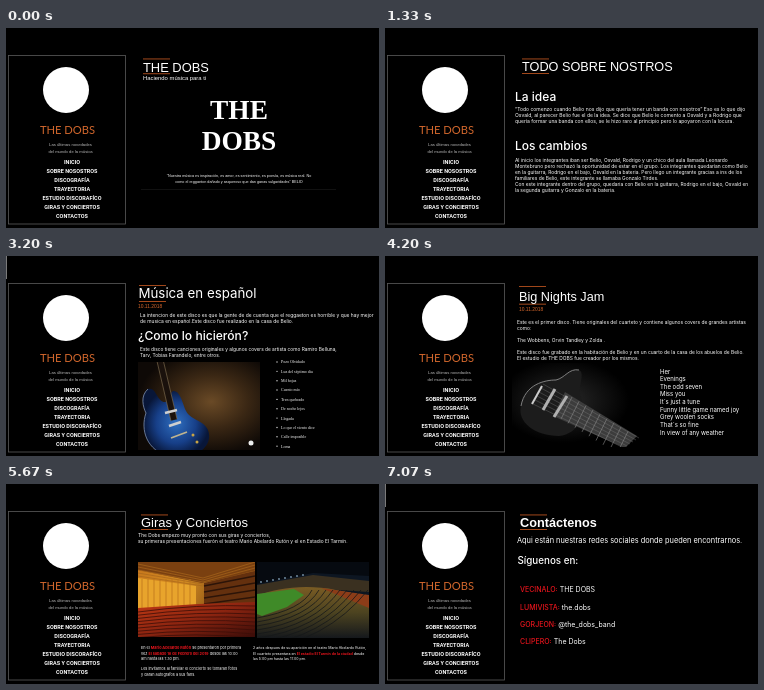
Recreate the animation shown at these times as an HTML page. Size 373x200 px, loop 7940 ms.

```html
<!DOCTYPE html>
<html lang="es">
<head>
<meta charset="utf-8">
<title>Sitio de la banda</title>
<style>
html, body { margin: 0; width: 100%; height: 100%; overflow: hidden; background: #000; }
svg { display: block; width: 100%; height: 100%; }
text { fill: #fff; font-family: Inter, "Open Sans", sans-serif; }
.arial { font-family: "Liberation Sans", Arial, sans-serif; }
.serif { font-family: "Liberation Serif", "Times New Roman", serif; }
.menu { font-family: Roboto, sans-serif; font-weight: 700; }
.brand { font-family: Lato, sans-serif; fill: #d0662c; }
.mid { text-anchor: middle; }
.bold { font-weight: 700; }
.half { font-weight: 500; }
.dim { fill: #bbb; }
.date { fill: #d9682c; }
.red { fill: #e8141c; }
.blue { fill: #35a8e0; }
</style>
</head>
<body>
<svg id="stage" viewBox="0 0 373 200" preserveAspectRatio="none">
  <defs>
    <radialGradient id="brown" cx=".6" cy=".45" r=".6">
      <stop offset="0" stop-color="#6a4a26"/><stop offset=".5" stop-color="#3a2714"/><stop offset="1" stop-color="#0e0906"/>
    </radialGradient>
    <radialGradient id="bluewood">
      <stop offset="0" stop-color="#2f6fc0"/><stop offset=".6" stop-color="#173f88"/><stop offset="1" stop-color="#081638"/>
    </radialGradient>
    <radialGradient id="grey" cx=".4" cy=".45" r=".5">
      <stop offset="0" stop-color="#2a2a2a"/><stop offset="1" stop-color="#000"/>
    </radialGradient>
    <radialGradient id="glow" cx=".52" cy=".5" r=".66">
      <stop offset=".28" stop-color="#e88a26"/><stop offset=".5" stop-color="#a04c0e"/>
      <stop offset=".78" stop-color="#522004"/><stop offset="1" stop-color="#210b02"/>
    </radialGradient>
    <linearGradient id="ring" x1="0" y1="0" x2="1" y2="1">
      <stop offset="0" stop-color="#d9761a"/><stop offset="1" stop-color="#ffe08a"/>
    </linearGradient>
    <linearGradient id="hall" x1="0" y1="0" x2="1" y2=".3">
      <stop offset="0" stop-color="#c8781c"/><stop offset=".45" stop-color="#d08a22"/><stop offset="1" stop-color="#5c2c0c"/>
    </linearGradient>
    <linearGradient id="seats" x1="0" y1="0" x2="1" y2="1">
      <stop offset="0" stop-color="#c23a14"/><stop offset=".5" stop-color="#8a2410"/><stop offset="1" stop-color="#3a0c08"/>
    </linearGradient>
    <linearGradient id="stand" x1="0" y1="0" x2="0" y2="1">
      <stop offset="0" stop-color="#7a5c24"/><stop offset=".5" stop-color="#4c4320"/><stop offset="1" stop-color="#15181c"/>
    </linearGradient>
  </defs>
</svg>
<script>
const LOOP = 7940;
const CUTS = [0, 1130, 2270, 3400, 4530, 5670, 6800];
const stage = document.getElementById('stage');

const text = (x, y, size, str, cls = '') =>
  `<text x="${x}" y="${y}" font-size="${size}" class="${cls}">${str}</text>`;
const lines = (x, y, step, size, list, cls) =>
  list.map((s, i) => text(x, y + i * step, size, s, cls)).join('');
const rect = (x, y, w, h, fill) =>
  `<rect x="${x}" y="${y}" width="${w}" height="${h}" fill="${fill}"/>`;
const path = (d, fill) => `<path d="${d}" fill="${fill}"/>`;
const stroke = (d, color, width) =>
  `<path d="${d}" fill="none" stroke="${color}" stroke-width="${width}"/>`;
const oval = (x, y, rx, ry, fill, more = '') =>
  `<ellipse cx="${x}" cy="${y}" rx="${rx}" ry="${ry}" fill="${fill}" ${more}/>`;
const bars = (x, top, bottom) =>
  rect(x, top, 27, .9, '#b4501e') + rect(x, bottom, 27, .9, '#b4501e');
const span = (cls, s) => `<tspan class="${cls}">${s}</tspan>`;
const repeat = (n, fn) => Array.from({ length: n }, (_, i) => fn(i)).join('');
const photo = (id, x, y, w, h, fill, art) =>
  `<clipPath id="${id}"><rect x="${x}" y="${y}" width="${w}" height="${h}"/></clipPath>
   <g clip-path="url(#${id})">${rect(x, y, w, h, fill)}${art}</g>`;

const edge = rect(0, 0, .8, 23, '#999');

const sidebar =
  '<rect x="2.5" y="27.5" width="117" height="168.5" fill="#000" stroke="#5a5a5a" stroke-width=".8"/>' +
  oval(60, 62, 23, 23, '#fff') +
  text(61.5, 106, 11.2, 'THE DOBS', 'brand mid') +
  lines(64.5, 117.5, 7, 4.2, ['Las últimas novedades', 'del mundo de la música'], 'arial dim mid') +
  lines(66, 136.4, 9, 5.5, ['INICIO', 'SOBRE NOSOSTROS', 'DISCOGRAFÍA', 'TRAYECTORIA',
    'ESTUDIO DISCORAFÍCO', 'GIRAS Y CONCIERTOS', 'CONTACTOS'], 'menu mid');

const blueGuitar = photo('p1', 132, 106, 122, 88, 'url(#brown)',
  path('M142 133C134 140 137 151 140 157C134 174 141 195 163 200C190 205 208 190 202 174C197 163 184 165 179 153C176 144 173 134 167 135C163 137 165 146 159 146C151 146 150 130 142 133Z', 'url(#bluewood)') +
  stroke('M142 133C134 140 137 151 140 157C134 174 141 195 163 200', '#8fa3c4', .7) +
  stroke('M153 100L168 164', '#1a110c', 6.5) +
  stroke('M150 101L165 165M156 99L171 163', '#8a7858', .6) +
  stroke('M159 157L171 154M163 170L175 166', '#cfcfcf', 2.6) +
  stroke('M165 182L181 176', '#c0b48f', 1.8) +
  oval(187, 179, 1.5, 1.5, '#c8a444') + oval(191, 186, 1.5, 1.5, '#c8a444')) +
  oval(245, 187, 2.5, 2.5, '#eee');

const greyGuitar = photo('p2', 127, 107, 130, 84, 'url(#grey)',
  path('M136 150C140 128 160 124 171 124C180 122 184 112 194 114C201 118 192 130 196 141C202 158 194 178 174 180C150 180 132 166 136 150Z', '#1c1c1c') +
  stroke('M136 150C140 128 160 124 171 124C180 122 184 112 194 114', '#8c8c8c', .9) +
  path('M180 136L252 180L240 192L168 160Z', '#3c3c3c') +
  repeat(6, i => stroke(`M${158 - i * 2} ${128 + i * 4}L${254 - i * 3} ${182 + i * 2}`, '#777', .4)) +
  repeat(9, i => stroke(`M${187 + i * 7} ${141 + i * 4.3}l-11 22`, '#8c8c8c', .6)) +
  stroke('M170 133L158 154M182 140L169 161', '#b0b0b0', 3) +
  stroke('M157 130L147 148', '#ccc', 2));

const eclipse = photo('p3', 128, 83, 96, 105, 'url(#glow)',
  oval(178, 135, 16.5, 27, '#050200', 'stroke="url(#ring)" stroke-width="1.5"'));

const theatre = photo('p4', 132, 78, 117, 75, 'url(#hall)',
  path('M132 78H249V88L196 99L132 86Z', '#7a4010') +
  repeat(5, i => stroke(`M132 ${80 + i * 3}L197 ${94 + i * 2}L249 ${78 + i * 3}`, '#a8661c', .7)) +
  path('M132 94L190 102V122L132 125Z', '#e8a42c') +
  repeat(9, i => stroke(`M${136 + i * 6} 95V124`, '#b8701c', .7)) +
  path('M198 99L249 87V120L198 122Z', '#64300e') +
  repeat(4, i => stroke(`M198 ${102 + i * 6}L249 ${92 + i * 7}`, '#2c1408', 1.5)) +
  path('M132 124L192 120L249 118V153H132Z', 'url(#seats)') +
  repeat(9, i => stroke(`M132 ${128 + i * 3.2}Q190 ${120 + i * 3.5} 249 ${122 + i * 4}`, '#3c0e08', .8)));

const stadium = photo('p5', 251, 78, 112, 76, '#0d1622',
  path('M251 78H363V92L307 89L251 100Z', '#060a10') +
  path('M251 101L307 91L363 97V108L300 104L251 111Z', '#3a3020') +
  repeat(8, i => oval(255 + i * 6, 98 - i, .9, .7, '#a8cce8')) +
  path('M251 112C270 104 300 100 330 106L363 112V154H251Z', 'url(#stand)') +
  path('M315 104L363 111V124Z', '#8c3c18') +
  path('M251 110L288 105L298 111L281 123L256 132L251 130Z', '#3f8a28') +
  repeat(9, i => stroke(`M251 ${134 + i * 4}Q${296 + i * 3} ${126 + i * 4} ${306 + i * 7} 106`, '#16181a', .8)));

const slides = [
  bars(137, 30.5, 45.3) +
  text(137, 43.6, 12.9, 'THE DOBS', 'arial') +
  text(137, 52, 5.9, 'Haciendo música para ti', 'arial') +
  lines(233, 91, 30.5, 27.4, ['THE', 'DOBS'], 'serif bold mid') +
  lines(233, 148.7, 6.4, 3.75, [
    '“Nuestra música es inspiración, es amor, es sentimiento, es poesía, es música real. No',
    'como el reggaeton dañado y asqueroso que dan ganas vulgaridades” BELIO'], 'arial mid') +
  rect(135, 161, 195, .5, '#222'),

  bars(137, 30.5, 45) +
  text(137, 43, 12.7, 'TODO SOBRE NOSTROS', 'arial') +
  text(130, 73, 12, 'La idea', 'half') +
  lines(130, 83, 6.2, 5, [
    '“Todo comenzo cuando Belio nos dijo que quería tener un banda con nosotros” Eso es lo que dijo',
    'Osvald, al parecer Belio fue el de la idea. Se dice que Belio le comento a Osvald y a Rodrigo que',
    'quería formar una banda con ellos, se le hizo raro al principio pero lo apoyaron con la locura.']) +
  text(130, 122, 12, 'Los cambios', 'half') +
  lines(130, 134.3, 5.9, 4.9, [
    'Al inicio los integrantes iban ser Belio, Osvald, Rodrigo y un chico del aula llamada Leonardo',
    'Montebruno pero rechazó la oportunidad de estar en el grupo. Los integrantes quedarían como Belio',
    'en la guitarra, Rodrigo en el bajo, Osvald en la bateria. Pero llego un integrante gracias a ins de los',
    'familiares de Belio, este integrante se llamaba Gonzalo Tirdes.',
    'Con este integrante dentro del grupo, quedaria con Belio en la guitarra, Rodrigo en el bajo, Osvald en',
    'la segunda guitarra y Gonzalo en la bateria.']),

  edge + bars(133, 29, 45) +
  text(132.5, 42, 13.3, 'Música en español') +
  text(132, 51.8, 4.9, '10.11.2018', 'arial date') +
  lines(134, 61, 6.2, 4.9, [
    'La intencion de este disco es que la gente de de cuenta que el reggaeton es horrible y que hay mejor',
    'de musica en español.Este disco fue realizado en la casa de Belio.']) +
  text(132, 83.5, 12.1, '¿Como lo hicierón?', 'half') +
  lines(134, 95, 6.2, 4.8, [
    'Este disco tiene canciones originales y algunos covers de artista como Ramiro Belluna,',
    'Tarv, Tobias Farandelo, entre otros.']) +
  blueGuitar +
  repeat(10, i => oval(271, 106 + i * 9.35, .7, .7, '#ddd')) +
  lines(275, 107.4, 9.35, 4, ['Pozo Olvidado', 'Luz del séptimo dia', 'Mil hojas', 'Cuento mío',
    'Tren quebrado', 'De noche lejos', 'Llegada', 'Lo que el viento dice', 'Calle imposible', 'Loma'], 'serif'),

  bars(134, 30, 47.7) +
  text(134, 44.5, 12.7, 'Big Nights Jam', 'arial') +
  text(134, 55.2, 4.9, '10.11.2018', 'arial date') +
  lines(132, 67.5, 6, 4.9, [
    'Este es el primer disco. Tiene originales del cuarteto y contiene algunos covers de grandes artistas',
    'como:', '', 'The Wobbens, Orvin Tandley y Zolda .', '',
    'Este disco fue grabado en la habitación de Belio y en un cuarto de la casa de los abuelos de Belio.',
    'El estudio de THE DOBS fue creador por los mismos.']) +
  greyGuitar +
  lines(275, 117.5, 7.65, 6, ['Her', 'Evenings', 'The odd seven', 'Miss you', 'It´s just a tune',
    'Funny little game named joy', 'Grey woolen socks', 'That´s so fine', 'In view of any weather']),

  bars(134, 30, 48) +
  text(134, 45, 12.7, 'Estudio Discografico', 'arial') +
  lines(132, 58.3, 6, 4.9, [
    '“Aqui se realiza toda la magia”, esto es lo que dice Belio al respecto del tema de su estudio',
    'discografico.']) +
  eclipse +
  lines(225, 87, 5.6, 4.9, [
    'Belio dialogo con los demas itengrantes y les dijo que ellos',
    'necesitaban un contrato conn alguna compañia',
    'discografica',
    'porque ellos podian crear la suya.', '',
    'Entonces le dijeron a Belio que mirara un nombre y que',
    'creara la imagen o que la buscara.',
    'Asi que se puso a buscar y encontro 2 opciones,',
    'eran ' + span('blue', 'BrassHarbour o Fernglade'), '',
    'Belio le pregunto a cual era mejor logo, a los',
    'muchachos les optarón por BrassHarbour,',
    'Belio se puso a buscar imagenes del sol y sus rayos pero',
    'nada le llamaba la atencion;',
    'hasta que decidio buscar al Eclipse solar para ver si',
    'encontraba algo que le pudiese interesar,',
    'y efectivamente le llamo la atención la imagen de un',
    'Eclipse hermoso.',
    'La comunico a los demás y les gusto la idea.']),

  bars(135, 30.5, 45) +
  text(135, 42.6, 13, 'Giras y Conciertos', 'arial') +
  lines(132, 53, 6.4, 4.85, [
    'The Dobs empezo muy pronto con sus giras y conciertos,',
    'su primeras presentaciones fuerón el teatro Mario Abelardo Rutón y el en Estadio El Tarmín.']) +
  theatre + stadium +
  lines(135, 165, 5.5, 3.8, [
    'En el ' + span('red bold', 'Mario Abelardo Rutón') + ' se presentaron por primera',
    'vez ' + span('red bold', 'El sabado 16 de Febrero del 2019') + ' desde las 10:00',
    'am hasta las 1:30 pm.']) +
  lines(135, 186, 5.5, 3.8, [
    'Les invitamos al familiar el concierto se tomaran fotos',
    'y daran autografos a sus fans.']) +
  lines(247, 165, 5.5, 3.6, [
    '2 años despues de su aparición en el teatro Mario Abelardo Rutón,',
    'El cuarteto presentara en ' + span('red bold', 'El estadio El Tarmín de la ciudad') + ' desde',
    'las 5:00 pm hasta las 11:00 pm.']),

  edge + bars(135, 30.5, 45) +
  text(135, 42.5, 12.7, 'Contáctenos', 'arial bold') +
  text(132, 58.5, 7.4, 'Aqui están nuestras redes sociales donde pueden encontrarnos.') +
  text(132.5, 79.6, 9.8, 'Síguenos en:', 'half') +
  lines(135, 108.2, 17.3, 7, [
    ['VECINALO:', 'THE DOBS'], ['LUMIVISTA:', 'the.dobs'],
    ['GORJEON:', '@the_dobs_band'], ['CLIPERO:', 'The Dobs']
  ].map(([site, user]) => `${span('red half', site)} ${user}`))
];

stage.insertAdjacentHTML('beforeend',
  rect(0, 0, 373, 200, '#000') + sidebar + slides.map(s => `<g class="slide">${s}</g>`).join(''));
const groups = [...stage.querySelectorAll('.slide')];

function draw(now) {
  const t = now % LOOP;
  const current = CUTS.filter(c => c <= t).length - 1;
  groups.forEach((g, i) => g.setAttribute('display', i === current ? 'inline' : 'none'));
}

const start = performance.now();
function tick() {
  draw(performance.now() - start);
  requestAnimationFrame(tick);
}
tick();
</script>
</body>
</html>
```
